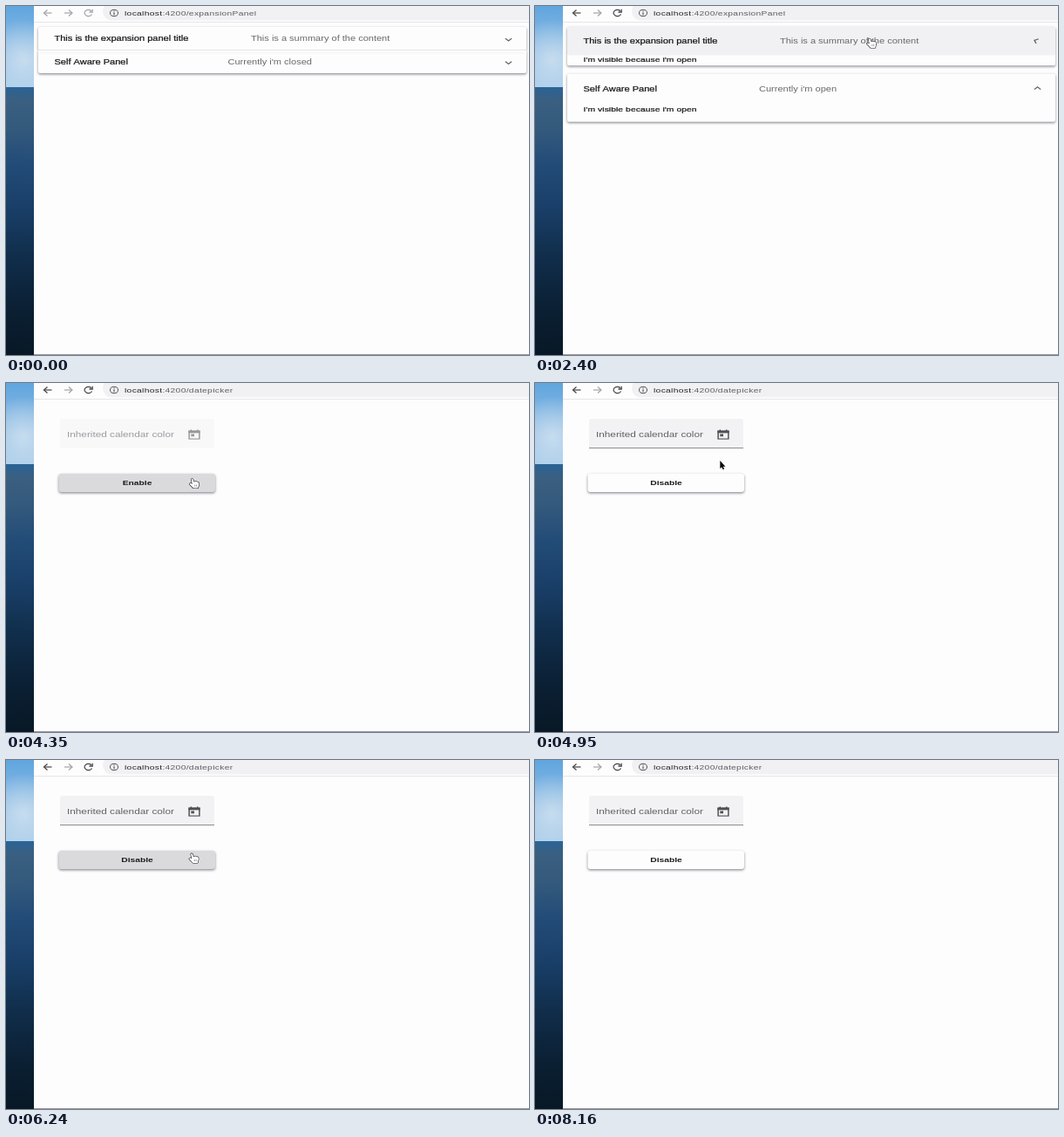
Recreate the animation shown at these times as an HTML page with a canvas. Size 600 by 400 pixels, loop 8.22 s.

```html
<!DOCTYPE html>
<html lang="en">
<head>
<meta charset="utf-8">
<title>Component demo</title>
<style>
html, body { margin: 0; width: 100%; height: 100%; overflow: hidden; background: #fdfdfd; }
canvas { display: block; width: 600px; height: 400px; }
</style>
</head>
<body>
<canvas id="stage"></canvas>
<script>
const LOOP = 8220;
const SX = 0.735, SY = 0.56;
const INK = '#1a1a1c', SOFT = '#68686c', PALE = '#a4a4a8';
const PAPER = '#fdfdfd', TINT = '#f1f1f3', RULE = '#e6e6ea';

const canvas = document.getElementById('stage');
const ctx = canvas.getContext('2d');
const ratio = window.devicePixelRatio || 1;
canvas.width = 600 * ratio;
canvas.height = 400 * ratio;

const clamp = v => Math.max(0, Math.min(1, v));
const smooth = v => { v = clamp(v); return v * v * (3 - 2 * v); };
const mix = (a, b, p) => a + (b - a) * p;
const ramp = (t, start, length) => smooth((t - start) / length);
const between = (t, a, b) => t >= a && t < b;

// Moments of the clicks
const OPEN_SECOND = 930, OPEN_FIRST = 2270, PAGE_CHANGE = 3330;
const TOGGLES = [4230, 4750, 6420, 7280];
const CALENDAR = [[3700, 4000], [5250, 5850]];

// time, x, y of the pointer tip
const PATH = [
  [330, 430, 240], [800, 387, 68.5], [2100, 387, 68.5], [2250, 382.5, 37],
  [2700, 382.5, 37], [3100, 250, 9], [3350, 240, 14], [3670, 214, 57], [3960, 216, 62],
  [4180, 212.5, 109.5], [4800, 212.5, 109.5], [5150, 212, 58], [5900, 212, 58], [6300, 212, 110],
  [6870, 212, 110], [7010, 226, 59], [7080, 226, 59], [7230, 214, 112], [7300, 214, 112],
  [7560, 383, 150], [7845, 383, 150]
];

function pointerAt(t) {
  if (!between(t, PATH[0][0], PATH[PATH.length - 1][0])) return null;
  const i = PATH.findIndex(p => p[0] > t);
  const [t0, x0, y0] = PATH[i - 1], [t1, x1, y1] = PATH[i];
  const p = smooth((t - t0) / (t1 - t0));
  return { x: mix(x0, x1, p), y: mix(y0, y1, p) };
}

const inside = (p, x, y, w, h) => !!p && p.x >= x && p.x <= x + w && p.y >= y && p.y <= y + h;

function box(x, y, w, h, fill) {
  ctx.fillStyle = fill;
  ctx.fillRect(x, y, w, h);
}

function rounded(x, y, w, h, r, fill) {
  ctx.beginPath();
  ctx.roundRect(x, y, w, h, r);
  ctx.fillStyle = fill;
  ctx.fill();
}

function card(x, y, w, h, r, fill = PAPER) {
  ctx.save();
  ctx.shadowColor = 'rgba(50,50,70,.6)';
  ctx.shadowBlur = 3 * ratio;
  ctx.shadowOffsetY = 1.2 * ratio;
  rounded(x, y, w, h, r, fill);
  ctx.restore();
}

function line(points, color, width = 1.2) {
  ctx.beginPath();
  points.forEach(([x, y]) => ctx.lineTo(x, y));
  ctx.strokeStyle = color;
  ctx.lineWidth = width;
  ctx.stroke();
}

function ring(x, y, rx, ry, color, width, from = 0, to = 7) {
  ctx.beginPath();
  ctx.ellipse(x, y, rx, ry, 0, from, to);
  ctx.strokeStyle = color;
  ctx.lineWidth = width;
  ctx.stroke();
}

// Text in page units, centred vertically on y
function text(str, x, y, size, color, { align = 'left', weight = 400, medium = false, spacing = 0 } = {}) {
  ctx.save();
  ctx.translate(x, y);
  ctx.scale(SX, SY);
  ctx.font = `${weight} ${size}px "Liberation Sans", Arial, sans-serif`;
  ctx.letterSpacing = spacing + 'px';
  ctx.textAlign = align;
  ctx.fillStyle = ctx.strokeStyle = color;
  ctx.fillText(str, 0, size * 0.36);
  if (medium) {
    ctx.lineWidth = 0.4;
    ctx.strokeText(str, 0, size * 0.36);
  }
  const width = ctx.measureText(str).width * SX;
  ctx.restore();
  return width;
}

function gradient(x0, y0, x1, y1, stops) {
  const g = ctx.createLinearGradient(x0, y0, x1, y1);
  stops.forEach(([at, color]) => g.addColorStop(at, color));
  return g;
}

function drawDesktop() {
  box(0, 0, 32, 93, gradient(0, 0, 0, 93, [[0, '#5fa5de'], [0.5, '#8dbbe4'], [1, '#a9cdea']]));
  const glow = ctx.createRadialGradient(20, 62, 2, 20, 62, 46);
  glow.addColorStop(0, 'rgba(205,224,240,.85)');
  glow.addColorStop(1, 'rgba(205,224,240,0)');
  box(0, 0, 32, 93, glow);
  box(0, 93, 32, 307, gradient(0, 93, 0, 400, [
    [0, '#2a6496'], [0.05, '#3a5f80'], [0.16, '#33597c'], [0.28, '#234c78'],
    [0.45, '#193f68'], [0.64, '#102d4a'], [0.82, '#0b2034'], [1, '#081826']
  ]));
}

function drawToolbar(active, address) {
  const dark = active ? '#444448' : PALE;
  const arrow = (x, dir, color) => {
    line([[x - 4.5 * dir, 8], [x + 4.5 * dir, 8]], color);
    line([[x + 0.5 * dir, 4.5], [x + 4.5 * dir, 8], [x + 0.5 * dir, 11.5]], color);
  };
  rounded(111, -4, 500, 20.5, 10, TINT);
  box(32, 18, 568, 1, RULE);
  arrow(48, -1, dark);
  arrow(71.5, 1, PALE);

  ring(94.5, 8, 4.4, 3.6, dark, 1.2, 0.4, 5.6);
  line([[99.2, 3.8], [99.2, 7], [95.5, 7]], dark, 1.3);

  ring(124, 8, 4.5, 3.7, '#55555a', 1);
  box(123.4, 7.4, 1.2, 2.8, '#55555a');
  box(123.4, 5.6, 1.2, 1, '#55555a');

  const spacing = { spacing: 0.42 };
  const width = text('localhost', 136, 8, 14, '#242428', spacing);
  text(':4200/' + address, 136 + width, 8, 14, '#5c5c62', spacing);
}

function chevron(x, y, turn, color) {
  ctx.save();
  ctx.translate(x, y);
  ctx.scale(SX, SY);
  ctx.rotate(turn);
  line([[-5, -2.5], [0, 2.5], [5, -2.5]], color, 2);
  ctx.restore();
}

const headerHeight = p => mix(26.5, 36, p);
const panelHeight = p => headerHeight(p) + 19.2 * p;

function drawPanel(y, p, pointer, title, summary, summaryX) {
  const head = headerHeight(p), full = panelHeight(p), mid = y + head / 2;
  const hover = inside(pointer, 37, y, 560, head);
  card(37, y, 560, full, 2);
  if (hover) rounded(37, y, 560, head, 2, TINT);
  text(title, 55.5, mid, 15, INK, { medium: true });
  text(summary, summaryX, mid, 15, SOFT);
  chevron(576.5 - 2 * Math.sin(Math.PI * p), mid + mix(1.2, -1.2, p), Math.PI * p, SOFT);
  if (p > 0) {
    ctx.save();
    ctx.beginPath();
    ctx.rect(37, y + head, 560, full - head);
    ctx.clip();
    text("I'm visible because i'm open", 55.5, y + head + 5.1, 14, INK, { medium: true, spacing: 0.1 });
    ctx.restore();
  }
  return hover;
}

function drawPanels(t, pointer) {
  const first = ramp(t, OPEN_FIRST, 225), second = ramp(t, OPEN_SECOND, 225);
  const secondY = 24 + panelHeight(first) + 7.5 * second + 2.6 * first;
  const open = t >= OPEN_SECOND;
  const overSecond = drawPanel(secondY, second, pointer, 'Self Aware Panel',
    `Currently i'm ${open ? 'open' : 'closed'}`, open ? 257 : 254.5);
  const overFirst = drawPanel(24, first, pointer, 'This is the expansion panel title',
    'This is a summary of the content', 281);
  if (second === 0) {
    box(37, 50, 560, 3.5, PAPER);
    box(37, 50, 560, 1, RULE);
  }
  return overFirst || overSecond;
}

function drawDateIcon(x, y, color) {
  ctx.save();
  ctx.translate(x, y);
  ctx.scale(SX, SY);
  ctx.strokeStyle = color;
  ctx.lineWidth = 2;
  ctx.strokeRect(-8, -8, 16, 16);
  box(-9, -9, 18, 5, color);
  box(-6, -11, 2, 3, color);
  box(4, -11, 2, 3, color);
  box(-5, -2, 5, 5, color);
  ctx.restore();
}

function drawCalendar(amount) {
  if (amount <= 0) return;
  const column = i => 82 + 29.17 * i;
  ctx.save();
  ctx.globalAlpha = amount;
  ctx.translate(0, 75);
  ctx.scale(1, mix(0.8, 1, amount));
  ctx.translate(0, -75);
  card(61, 75, 216.5, 198, 3);

  text('JUL 2020', 77, 98, 14, INK, { weight: 700 });
  ctx.beginPath();
  ctx.moveTo(127.5, 97);
  ctx.lineTo(135, 97);
  ctx.lineTo(131.2, 100);
  ctx.fillStyle = SOFT;
  ctx.fill();
  [[229, 1], [259, -1]].forEach(([x, dir]) =>
    line([[x + 2.3 * dir, 94.3], [x - 2.3 * dir, 98], [x + 2.3 * dir, 101.7]], '#555558', 1.2));

  [...'SMTWTFS'].forEach((day, i) => text(day, column(i), 120.5, 11, '#8c8c90', { align: 'center' }));
  box(65, 128, 209, 1, RULE);
  text('JUL', 77, 144.5, 14, SOFT);
  for (let day = 1; day <= 31; day++) {
    const cell = day + 2;
    text(String(day), column(cell % 7), 144.5 + 22.4 * Math.floor(cell / 7), 13, INK,
      { align: 'center', medium: true });
  }
  ring(257, 144.6, 12.8, 10, '#909094', 0.8);
  ctx.restore();
}

function drawDatepicker(t, pointer) {
  const enabled = TOGGLES.filter(at => t >= at).length % 2 === 0;
  const open = CALENDAR.some(([a, b]) => between(t, a, b));
  const shown = Math.max(...CALENDAR.map(([a, b]) => ramp(t, a, 120) * (1 - ramp(t, b, 100))));
  const overField = enabled && !open && inside(pointer, 62, 41, 177, 33);
  const overIcon = overField && inside(pointer, 205, 50, 22, 18);
  const overButton = !open && inside(pointer, 60, 104, 180, 21);

  const fill = !enabled ? '#f8f8f9' : open || overField ? '#ebebed' : '#f2f2f4';
  rounded(62, 41, 177, 33.5, [3, 3, 0, 0], fill);
  if (enabled) box(62, 74, 177, 1, '#8e8e92');
  text('Inherited calendar color', 70, 59, 16, enabled ? '#616165' : '#9c9ca0');
  drawDateIcon(216, 59.6, open ? '#ffc62e' : enabled ? '#505054' : '#98989c');

  card(60.5, 104, 179.5, 21, 3, overButton ? '#dadadd' : PAPER);
  text(enabled ? 'Disable' : 'Enable', 150.5, 114.6, 14, INK, { align: 'center', weight: 700 });
  drawCalendar(shown);
  return overButton || overIcon;
}

function drawPointer({ x, y }, hand) {
  const shape = hand
    ? 'M0 .8Q1 -.4 2 .8L3.2 4L5 3.4L6.6 3.8L8.2 4.3Q9.2 5 8.8 7L7.8 11H2.6L-1.8 6.6Q-2 5.2 -.2 5.4L1.2 6.2Z'
    : 'M0 0V9L2 7.4L3.3 10.2L4.8 9.6L3.5 6.8H6.2Z';
  const path = new Path2D(shape);
  ctx.save();
  ctx.translate(x, y);
  ctx.lineJoin = 'round';
  ctx.lineWidth = hand ? 1.1 : 0.8;
  ctx.strokeStyle = hand ? '#18181a' : '#fff';
  ctx.fillStyle = hand ? '#fff' : '#08080a';
  ctx.stroke(path);
  ctx.fill(path);
  if (hand) [4.3, 6.2].forEach(px => line([[px, 7], [px, 9.2]], '#58585c', 0.6));
  ctx.restore();
}

function draw(t) {
  const pointer = pointerAt(t), dates = t >= PAGE_CHANGE;
  ctx.setTransform(ratio, 0, 0, ratio, 0, 0);
  box(0, 0, 600, 400, PAPER);
  drawToolbar(t >= OPEN_SECOND, dates ? 'datepicker' : 'expansionPanel');
  const hand = dates ? drawDatepicker(t, pointer) : drawPanels(t, pointer);
  box(32, 399, 568, 1, '#9a9a9e');
  drawDesktop();
  if (pointer) drawPointer(pointer, hand);
}

const start = performance.now();
function tick() {
  draw((performance.now() - start) % LOOP);
  requestAnimationFrame(tick);
}
tick();
</script>
</body>
</html>
```
